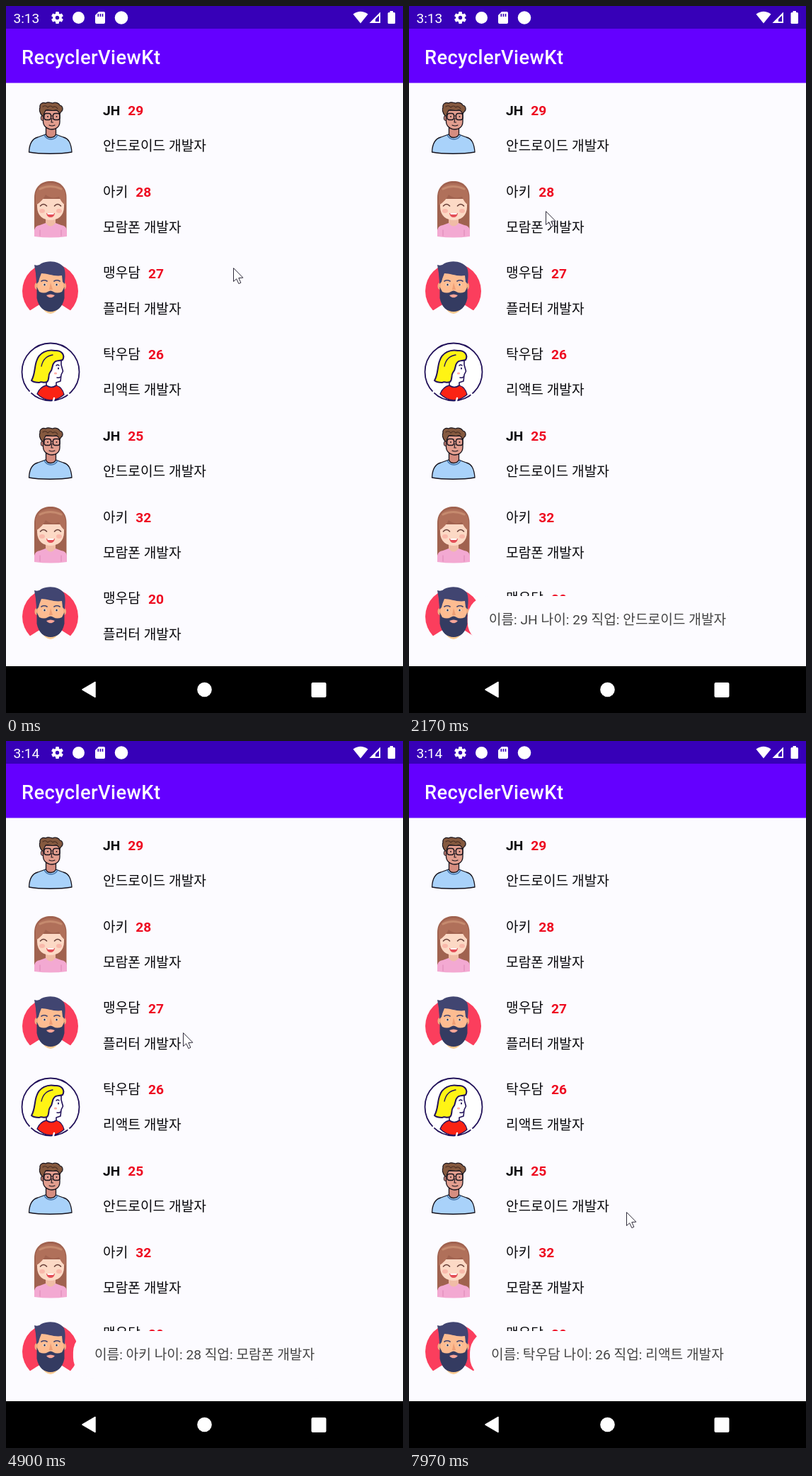
Recreate the animation shown at these times as an HTML page with a canvas. Size 561 by 997 pixels, loop 8 s.

```html
<!DOCTYPE html>
<html lang="ko">
<head>
<meta charset="utf-8">
<title>RecyclerViewKt</title>
<style>
html, body { margin: 0; width: 100%; height: 100%; overflow: hidden; background: #fcfbff; }
canvas { display: block; width: 561px; height: 997px; }
</style>
</head>
<body>
<canvas id="stage"></canvas>
<script>
const W = 561, H = 997, LOOP = 8000, PITCH = 114.75;
const PAGE = '#fcfbff', FONT = 'Roboto, "Noto Sans CJK KR", "Noto Sans CJK", sans-serif';
const BODY = 19.2;

const canvas = document.getElementById('stage');
const ctx = canvas.getContext('2d');
const dpr = window.devicePixelRatio || 1;
canvas.width = W * dpr;
canvas.height = H * dpr;

const people = [
  ['JH', '안드로이드 개발자'],
  ['아키', '모람폰 개발자'],
  ['맹우담', '플러터 개발자'],
  ['탁우담', '리액트 개발자']
];
const ages = [29, 28, 27, 26, 25, 32, 20];

// time, x, y of the pointer tip
const pointer = [
  [30, 321, 370], [830, 232, 205], [900, 232, 205], [1130, 220, 184],
  [1480, 220, 184], [2130, 193, 290], [2700, 193, 290], [3240, 205, 292],
  [3600, 253, 400], [4030, 250, 412], [4900, 250, 412], [5230, 246, 420],
  [5500, 227, 533], [5740, 227, 533], [6240, 227, 521], [6640, 227, 520],
  [7300, 227, 520], [7970, 307, 665]
];
const toastStarts = [1345, 3325, 5345, 7340];
const FADE = 500, CLOCK_TICK = 3800;

const clamp = v => Math.max(0, Math.min(1, v));
const ease = v => v * v * (3 - 2 * v);

function shape(d, fill, stroke, width = 1.5) {
  const p = new Path2D(d);
  if (fill) { ctx.fillStyle = fill; ctx.fill(p); }
  if (stroke) { ctx.strokeStyle = stroke; ctx.lineWidth = width; ctx.stroke(p); }
}

function oval(x, y, rx, ry, fill, stroke, width = 1.5) {
  ctx.beginPath();
  ctx.ellipse(x, y, rx, ry, 0, 0, Math.PI * 2);
  if (fill) { ctx.fillStyle = fill; ctx.fill(); }
  if (stroke) { ctx.strokeStyle = stroke; ctx.lineWidth = width; ctx.stroke(); }
}

function box(x, y, w, h, r, fill) {
  ctx.fillStyle = fill;
  ctx.beginPath();
  ctx.roundRect(x, y, w, h, r);
  ctx.fill();
}

function label(text, x, y, size, weight, color) {
  ctx.font = `${weight} ${size}px ${FONT}`;
  ctx.fillStyle = color;
  ctx.fillText(text, x, y);
  return ctx.measureText(text).width;
}

// Each avatar is drawn at the place where it first appears in the list.
const avatars = [
  function glasses() {
    const ink = '#17131c';
    shape('M32.5 206 C33 194 37 187 45 185 L56 181 H70 L81 185 C89 187 92 194 93 206 C76 209 48 209 32.5 206Z', '#a9d2fa', ink, 1.3);
    shape('M56.5 170 V181 C58 187 68 187 70.5 181 V170Z', '#d58d80', ink, 1.3);
    shape('M54 182 C58 190 69 190 73 182', null, '#3f70a8', 1.5);
    oval(51.5, 158, 2.2, 3.5, '#d58d80', ink, 1);
    shape('M52.5 147 H76 V163 C76 171 70 174 65 174 C58 174 52.5 169 52.5 163Z', '#e29e8f', ink, 1.3);
    shape('M51 155 C48 151 46 147 48 143 C47 138 52 135 56 137 C60 134 64 137 66 137 C70 135 75 137 76 140 C81 141 81 147 78 149 L76 152 C74 148 72 146 69 147 C65 149 60 145 56 147 C55 150 53 151 53 155Z', '#85593f', ink, 1.2);
    shape('M52 142 q4 -3 7 1 q4 -4 7 0 q4 -3 7 2', null, '#4c3025', 1.1);
    ctx.strokeStyle = ink;
    ctx.lineWidth = 1.3;
    for (const x of [54, 66.5]) {
      ctx.beginPath();
      ctx.roundRect(x, 151.5, 9.5, 9, 3);
      ctx.stroke();
      oval(x + 5, 156, 0.9, 1.1, ink);
    }
    shape('M63.5 155 H66.5 M65 158 L64 164 H66.5 M61 168 Q65 170 69 168', null, ink, 1.1);
  },
  function longHair() {
    shape('M40 325 V270 C40 255 50 247 63 247 C76 247 85.5 255 85.5 270 V325Z', '#a0624f');
    shape('M40 325 V316 Q41 310 48 309 L56 306 H70 L78 309 Q85 310 86 316 V325 Q63 328 40 325Z', '#f3a9d2');
    shape('M56 297 H70 V306 Q63 315 56 306Z', '#f0bca6');
    shape('M44 272 H82 V283 C82 296 73 302 63 302 C53 302 44 296 44 283Z', '#fcd9c5');
    shape('M42 281 V268 C42 256 51 250 63 250 C75 250 84 256 84 268 V281 Q78 277 75 269 Q64 273 56 266 Q52 275 42 281Z', '#b0705a');
    shape('M48 258 Q62 251 78 258', null, '#c58a6e', 3);
    oval(51, 289, 4, 3, '#f9b9ab');
    oval(75, 289, 4, 3, '#f9b9ab');
    shape('M48.5 282 Q53 277 57.5 282 M68.5 282 Q73 277 77.5 282', null, '#653c36', 1.6);
    shape('M57 292 H69 Q68 298 63 298 Q58 298 57 292Z', '#e34e57');
    shape('M58 292 H68 L67 294 H59Z', '#fff');
    shape('M48 324 V316 M78 324 V316', null, '#dc87b4', 1);
  },
  function beard() {
    ctx.save();
    ctx.beginPath();
    ctx.rect(20, 355, 86, 74);
    ctx.clip();
    oval(62.5, 402, 39.5, 39.5, '#fb3e5d');
    ctx.restore();
    shape('M33 430 L44 423 L53 418 H73 L81 423 L92 430 Q77 442 62 442 Q47 442 33 430Z', PAGE);
    shape('M52 416 H74 V425 Q71 433 63 434 Q54 433 52 425Z', '#fccb91');
    oval(43.5, 395, 3, 5, '#f4ae82');
    oval(82, 395, 3, 5, '#f4ae82');
    shape('M45 376 H81 V402 Q79 417 63 419 Q47 417 45 402Z', '#fdbc91');
    shape('M43 392 C43 385 42 381 42 377 L40 365 Q46 367 50 363 C61 358 76 360 82 369 C85 377 83 386 83 392 L80 389 L79 380 C69 382 58 377 50 377 Q47 384 46 389Z', '#414571');
    shape('M43.5 396 L47 403 Q54 406 59 403 Q63 400 67 403 Q72 406 79 403 L82.5 396 V412 C80 425 72 431 63 431 C54 431 46 425 43.5 412Z', '#343b61');
    shape('M57 408 Q63 405 69 408 Q66 412 63 411 Q60 412 57 408Z', '#f8a598');
    shape('M50 388 Q54 385.5 58 388 M68 388 Q72 385.5 76 388', null, '#414571', 1.7);
    for (const x of [54.5, 71.5]) {
      oval(x, 393, 2.3, 1.8, '#fff');
      oval(x, 393, 1.3, 1.6, '#30334f');
    }
    shape('M63 390 L61 400 H66Z', '#ef9e75');
  },
  function profile() {
    const ink = '#22125a';
    oval(63, 516, 40.5, 40.5, '#fff', ink, 1.8);
    shape('M44 547 Q48 537 57 535 H71 Q80 538 82 548 Q73 556 63 556 Q52 555 44 547Z', '#fb2314', ink, 1.3);
    shape('M57 520 V535 Q64 540 71 535 V531 L77 529 L78 520 L80.5 515 L78 506 V495 H62Z', '#fff', ink, 1.6);
    shape('M36 528 C41 520 40 510 43 501 C47 488 59 484 69 486 C78 485 84 492 80 499 C76 501 71 499 68 503 C64 507 67 512 62 517 C59 521 62 526 58 530 C53 532 50 529 47 531 C43 531 39 531 36 528Z', '#fff414', ink, 2);
    shape('M50 508 Q53 494 66 492', null, ink, 1.3);
    shape('M71 507 q2 -2 4 0 M72 524 q3 1 5 -1', null, ink, 1.5);
    oval(74, 511, 1, 1.6, ink);
    oval(70, 518, 2.2, 1.5, '#ffafa8');
    shape('M33 546 l5 -5 M66 560 l2 -7 M90 549 l-5 -5', null, PAGE, 2.5);
  }
];

function drawRow(age, i) {
  const kind = i % 4, dy = i * PITCH;
  const [name, job] = people[kind];
  ctx.save();
  ctx.translate(0, PITCH * (i - kind));
  avatars[kind]();
  ctx.restore();
  const weight = name === 'JH' ? 700 : 400;
  const w = label(name, 137, 153.8 + dy, BODY, weight, '#08080c');
  label(age, 137 + w + 11, 154.2 + dy, BODY, 700, '#ee0a20');
  label(job, 137, 204 + dy, BODY, 400, '#08080c');
}

function drawGear(x, y, bg) {
  ctx.save();
  ctx.translate(x, y);
  for (let i = 0; i < 6; i++) {
    box(-2.4, -8.5, 4.8, 5, 1, '#fff');
    ctx.rotate(Math.PI / 3);
  }
  oval(0, 0, 6.3, 6.3, '#fff');
  oval(0, 0, 2.7, 2.7, bg);
  ctx.restore();
}

function drawBars(clock) {
  const dark = '#3700b8';
  box(0, 0, W, 32, 0, dark);
  box(0, 32, W, 76.5, 0, '#6400ff');
  ctx.letterSpacing = '0.42px';
  label('RecyclerViewKt', 22, 81.5, 27.3, 500, '#fff');
  ctx.letterSpacing = '0px';
  label(clock, 10.5, 23.5, 19.1, 400, '#fff');
  drawGear(72.5, 16.5, dark);
  oval(102.5, 16.5, 8.5, 8.5, '#fff');
  shape('M131 8 H138 Q140 8 140 10 V23 Q140 25 138 25 H128 Q126 25 126 23 V13Z', '#fff');
  for (const x of [129.5, 132.6, 135.7]) box(x, 11, 1.6, 4, 0, dark);
  oval(163, 16.5, 9.3, 9.3, '#fff');
  shape('M490.5 11.5 Q501 4 511.5 11.5 L501 24.5Z', '#fff');
  shape('M529 8.5 V24 H513.5Z', '#fff');
  shape('M527 13.5 V22 H522 V18.5Z', dark);
  box(539.5, 9, 10.5, 16, 1.5, '#fff');
  box(542.5, 7, 4.5, 3, 0.5, '#fff');

  box(0, 931, W, 66, 0, '#000');
  shape('M108 964 L126 953.5 V974.5Z', '#fff', '#fff', 1.5);
  oval(280.5, 964, 10.3, 10.3, '#fff');
  box(431.5, 954, 21, 21, 2, '#fff');
}

// Toasts enter decelerating and leave accelerating, so they overlap.
function drawToast(i, t) {
  const start = toastStarts[i], next = toastStarts[i + 1] ?? Infinity;
  const enter = 1 - (1 - clamp((t - start) / FADE)) ** 2;
  const leave = 1 - clamp((t - next) / FADE) ** 2;
  const alpha = enter * leave;
  if (alpha <= 0) return;
  const [name, job] = people[i];
  const text = `이름: ${name} 나이: ${ages[i]} 직업: ${job}`;
  ctx.font = `400 ${BODY}px ${FONT}`;
  const w = ctx.measureText(text).width, x = (W - w) / 2;
  ctx.globalAlpha = alpha;
  box(x - 30, 832, w + 60, 67, 30, PAGE);
  label(text, x, 872, BODY, 400, '#444');
  ctx.globalAlpha = 1;
}

function pointerAt(t) {
  const i = pointer.findIndex(k => k[0] > t);
  if (i === 0) return pointer[0].slice(1);
  if (i < 0) return pointer[pointer.length - 1].slice(1);
  const [t0, x0, y0] = pointer[i - 1], [t1, x1, y1] = pointer[i];
  const k = ease((t - t0) / (t1 - t0));
  return [x0 + (x1 - x0) * k, y0 + (y1 - y0) * k];
}

function drawPointer(t) {
  const [x, y] = pointerAt(t);
  ctx.save();
  ctx.translate(x + 0.5, y);
  ctx.lineJoin = 'miter';
  shape('M0 0 V18.5 L4.2 14.8 L7.4 21.6 L10.4 20.2 L7.3 13.6 L13 13.2Z', '#fff', '#302c3c', 1);
  ctx.restore();
}

function frame() {
  const t = performance.now() % LOOP;
  ctx.setTransform(dpr, 0, 0, dpr, 0, 0);
  ctx.lineCap = ctx.lineJoin = 'round';
  box(0, 0, W, H, 0, PAGE);
  ages.forEach(drawRow);
  drawBars(t < CLOCK_TICK ? '3:13' : '3:14');
  toastStarts.forEach((_, i) => drawToast(i, t));
  drawPointer(t);
  requestAnimationFrame(frame);
}
frame();
</script>
</body>
</html>
```
